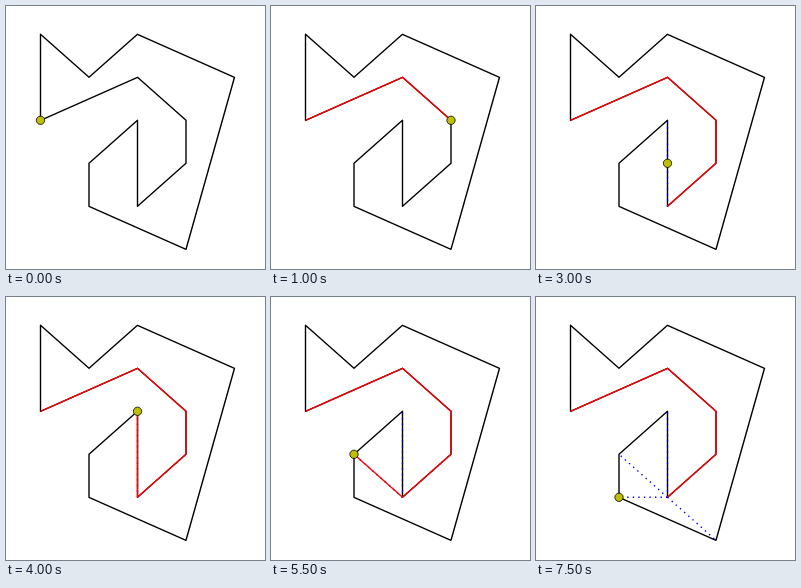
These frames come from a looping animation (259 by 263 pixels, 8000 ms). An HTML page with a canvas:

```html
<!DOCTYPE html>
<html lang="en">
<head>
<meta charset="utf-8">
<title>Polygon ear cutting</title>
<style>
html, body { margin: 0; width: 100%; height: 100%; overflow: hidden; background: #fff; }
canvas { display: block; }
</style>
</head>
<body>
<canvas id="stage" width="259" height="263"></canvas>
<script>
const ctx = document.getElementById('stage').getContext('2d');
const STEP = 500;
const LINE = 1.39;

// Polygon corners as [column, row], in walking order.
const corners = [
  [0, 2], [2, 1], [3, 2], [3, 3], [2, 4], [2, 3], [2, 2],
  [1, 3], [1, 4], [3, 5], [4, 1], [2, 0], [1, 1], [0, 0]
].map(([col, row]) => [34.5 + col * 48.5, 28.3 + row * 43]);

// Walk forward; wherever an ear is found, cut it off and step back.
function buildStates() {
  const ears = [6, 5, 7, 8];
  const states = [];
  let chain = [0], next = 1, cuts = [];
  const save = (at, path) => states.push({ at, path: [...path], cuts: [...cuts] });
  save(0, chain);
  while (states.length < 16) {
    chain.push(next++);
    save(chain.at(-1), chain);
    while (ears.includes(chain.at(-1)) && states.length < 16) {
      const ear = chain.pop();
      cuts.push([chain.at(-1), next]);
      save(ear, chain);
      if (states.length < 16) save(chain.at(-1), chain);
    }
  }
  return states;
}
const states = buildStates();

function stroke(ids, color, dash = [], closed = false) {
  ctx.beginPath();
  ids.forEach(i => ctx.lineTo(...corners[i]));
  if (closed) ctx.closePath();
  ctx.strokeStyle = color;
  ctx.lineWidth = LINE;
  ctx.lineJoin = 'round';
  ctx.setLineDash(dash);
  ctx.stroke();
}

function marker([x, y]) {
  ctx.beginPath();
  ctx.arc(x, y, 4.17, 0, Math.PI * 2);
  ctx.fillStyle = '#bfbf00';
  ctx.fill();
  ctx.setLineDash([]);
  ctx.strokeStyle = '#000';
  ctx.lineWidth = 0.8;
  ctx.stroke();
}

function draw(time) {
  const { at, path, cuts } = states[Math.floor(time / STEP) % states.length];
  ctx.fillStyle = '#fff';
  ctx.fillRect(0, 0, 259, 263);
  stroke(corners.keys().toArray ? [...corners.keys()] : corners.map((_, i) => i), '#000', [], true);
  cuts.forEach(cut => stroke(cut, '#00f', [1.39, 4.17]));
  stroke(path, '#f00');
  marker(corners[at]);
}

function tick() {
  draw(performance.now());
  requestAnimationFrame(tick);
}
tick();
</script>
</body>
</html>
```
